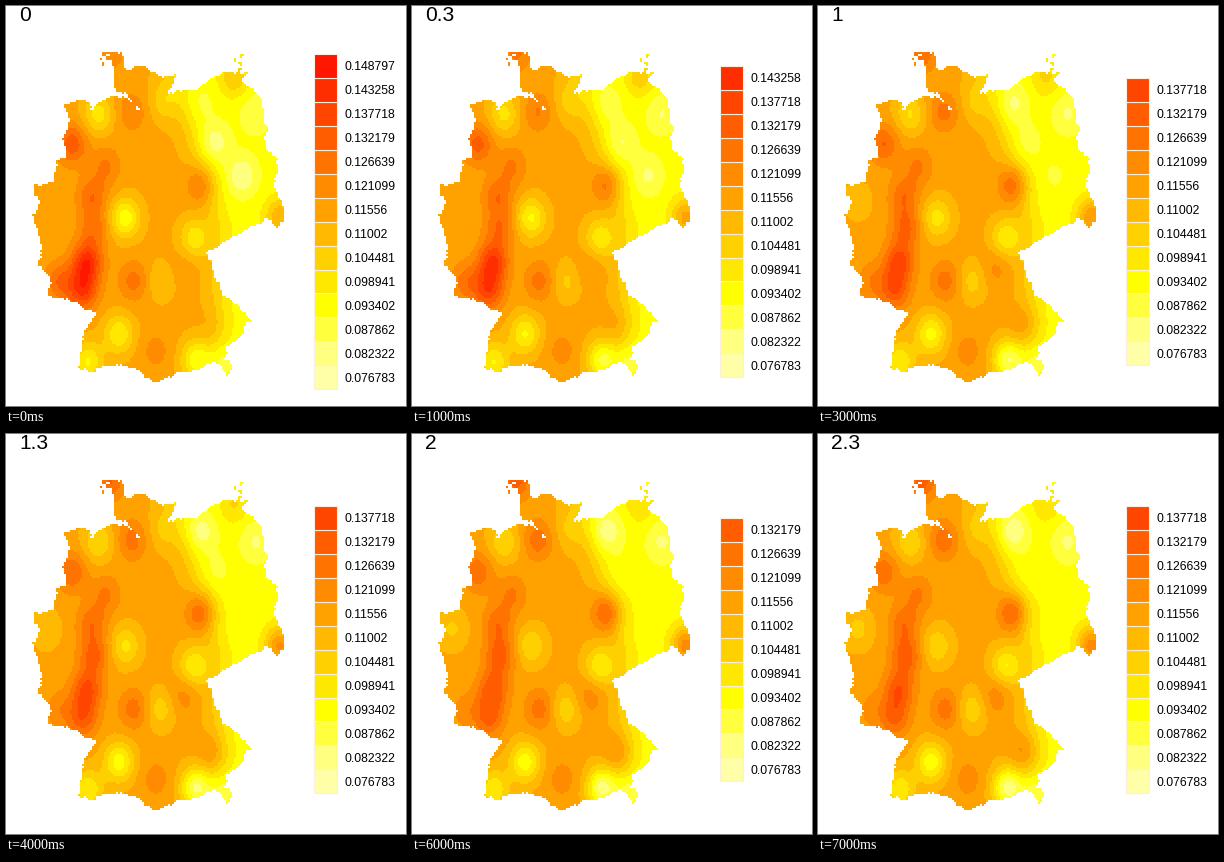
A matplotlib script that plays this animation: 400x400 px, repeating every 8000 ms.

```python
import numpy as np
import matplotlib.pyplot as plt
from matplotlib.animation import FuncAnimation
from matplotlib.patches import Rectangle
from matplotlib.path import Path

SIZE, DPI, CELL = 400, 100, 2
FRAMES = 8
LOWEST, STEP = 0.0767829, 0.00553957
PITCH, MIDDLE = 23.95, 215.6
TOP_LEVEL = [13, 12, 12, 11, 11, 11, 10, 11]

# Key points of the border, clockwise from the north-west tip
BORDER = [
    (95, 45), (116, 46), (119, 63), (141, 63), (157, 72), (171, 66), (167, 79),
    (163, 87), (179, 84), (203, 75), (215, 67), (241, 67), (236, 74), (255, 91),
    (258, 112), (262, 123), (257, 130), (271, 153), (268, 178), (278, 201),
    (279, 212), (271, 222), (260, 212), (238, 225), (199, 247), (208, 270),
    (232, 299), (245, 315), (234, 331), (219, 341), (226, 362), (222, 371),
    (216, 360), (200, 358), (171, 367), (148, 377), (132, 364), (115, 358),
    (88, 365), (72, 363), (77, 330), (90, 307), (71, 297), (40, 289), (45, 276),
    (32, 258), (36, 243), (27, 210), (34, 195), (28, 179), (48, 176), (49, 155),
    (60, 152), (56, 133), (64, 114), (58, 99), (83, 95), (87, 104), (106, 90),
    (119, 91), (137, 105), (122, 88), (110, 84), (108, 65), (104, 50),
]

# Bumps on the base field: x, y, height at the start and at the end
BUMPS = [
    (104, 46, 1.5, 3.2), (92, 108, -2.8, -2.2), (126, 106, 1.6, 2.4),
    (66, 138, 3.4, 2.4), (100, 160, 1.8, 1.8), (158, 95, -1.8, -1.3),
    (195, 98, -0.8, -2.5), (209, 137, -2.1, -0.4), (236, 170, -2.4, 0.5),
    (250, 108, -1.4, -1.6), (228, 70, 2.6, 1.4), (274, 212, 3.6, 5.2),
    (196, 178, 2.7, 3.9), (119, 212, -4, -2.1), (188, 232, -2.8, -3.2),
    (40, 195, 0.4, -1.6), (86, 190, 2.5, 2.4), (88, 222, 2.2, 3.2),
    (81, 256, 5.2, 3.4), (77, 284, 4.6, 2.8), (54, 276, 2.6, 1),
    (128, 275, 2.2, 2.3), (154, 275, -1.4, -2.1), (178, 262, 0.6, 1.5),
    (150, 345, 1.1, 1.2), (113, 328, -3.2, -4), (82, 356, -3.4, -3.2),
    (190, 354, -3.8, -5.6), (214, 358, -2, -2), (208, 318, 0.6, 2),
]
BUMP_W, BUMP_H = 15, 20

rng = np.random.default_rng(4)


def heat_colors():
    """Pale yellow through yellow and orange to red, lowest level first."""
    pale = [(1, 1, b) for b in (0.66, 0.5, 0.24)]
    warm = [(1, g / 11, 0) for g in range(11, 0, -1)]
    return np.array(pale + warm)


def roughen(points, rounds=2, amount=0.08):
    """Push the middle of each edge sideways by a random share of its length."""
    p = np.array(points, float)
    for _ in range(rounds):
        edge = np.roll(p, -1, 0) - p
        shift = edge[:, ::-1] * [1, -1] * rng.normal(0, amount, (len(p), 1))
        p = np.stack([p, p + edge / 2 + shift], 1).reshape(-1, 2)
    return p


def land_mask(x, y):
    cells = np.c_[x, y]
    land = Path(roughen(BORDER)).contains_points(
        cells + rng.uniform(-0.7, 0.7, cells.shape))
    for cx, cy in [(98, 55), (232, 60)]:
        for ix, iy in rng.normal((cx, cy), (3, 4), (5, 2)):
            land |= np.hypot(x - ix, y - iy) < 1.6
    return land


def base_field(x, y):
    """Higher in the west, dropping across a slanted edge to the east."""
    edge = np.minimum(172 + 0.3 * (y - 85), 212)
    return 6.8 - 3.9 / (1 + np.exp((edge - x) / 8))


def progress(k):
    """Fast at first, then settling; 1 at the last step."""
    return (1 - np.exp(-k / 4)) / (1 - np.exp(-(FRAMES - 1) / 4))


COLORS = heat_colors()
side = SIZE // CELL
axis = (np.arange(side) + 0.5) * CELL
gx, gy = (g.ravel() for g in np.meshgrid(axis, axis))
land = land_mask(gx, gy)
lx, ly = gx[land], gy[land]
bx, by, start, end = np.array(BUMPS).T
bells = np.exp(-((lx[:, None] - bx) / BUMP_W) ** 2
               - ((ly[:, None] - by) / BUMP_H) ** 2)
base = base_field(lx, ly)

fig = plt.figure(figsize=(SIZE / DPI, SIZE / DPI), dpi=DPI, facecolor="white")
ax = fig.add_axes([0, 0, 1, 1])
ax.axis("off")
picture = ax.imshow(np.ones((side, side, 3)), extent=(0, SIZE, SIZE, 0),
                    interpolation="nearest", aspect="auto")
ax.set(xlim=(0, SIZE), ylim=(SIZE, 0))


def write(x, y, text, px):
    return ax.text(x, y, text, fontsize=px * 72 / DPI, family="Liberation Sans",
                   color="black", va="baseline")


title = write(13, 14.7, "", 21)
swatches, labels = [], []
for level, color in enumerate(COLORS):
    swatches.append(ax.add_patch(Rectangle((308, 0), 23, PITCH, facecolor=color,
                                           edgecolor="#fbeedc", linewidth=0.8)))
    labels.append(write(338.5, 0, f"{LOWEST + level * STEP:.6f}".rstrip("0"), 12.2))


def draw(k):
    top = TOP_LEVEL[k]
    field = base + bells @ (start + (end - start) * progress(k))
    rgb = np.ones((side * side, 3))
    rgb[land] = COLORS[np.clip(np.rint(field), 0, top).astype(int)]
    picture.set_data(rgb.reshape(side, side, 3))
    title.set_text(f"{round(k / 3, 1):g}")
    for level, (box, label) in enumerate(zip(swatches, labels)):
        y = MIDDLE + (top / 2 - level) * PITCH
        box.set_y(y - PITCH / 2)
        label.set_y(y + 4.3)
        box.set_visible(level <= top)
        label.set_visible(level <= top)
    return [picture, title, *swatches, *labels]


anim = FuncAnimation(fig, draw, frames=FRAMES, init_func=lambda: draw(0),
                     interval=1000, repeat=True, repeat_delay=0, blit=False)
plt.show()
```
